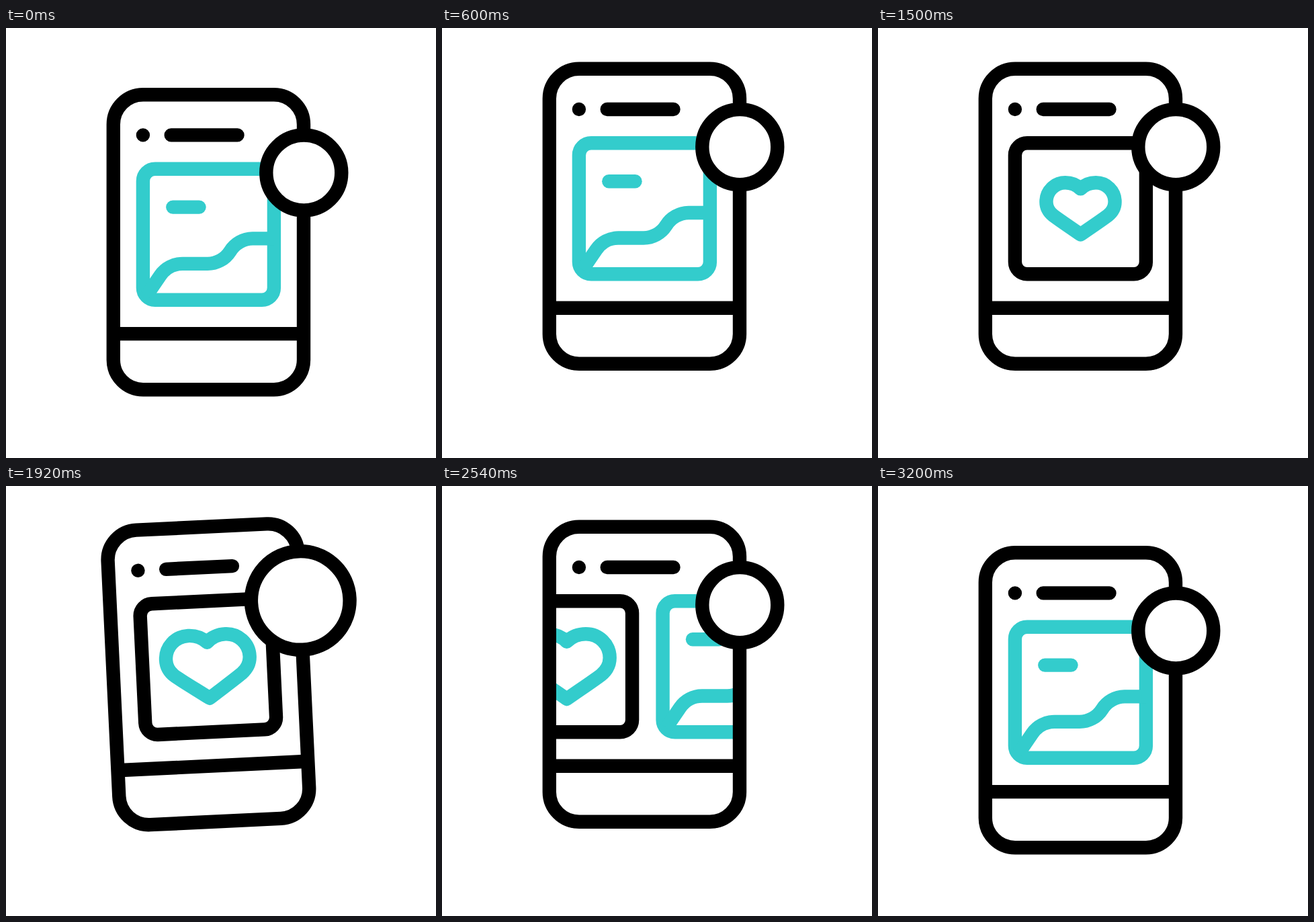
An HTML page for the animation above (3420 ms loop, 640 px wide and 640 px high).

```html
<!DOCTYPE html>
<html lang="en">
<head>
<meta charset="utf-8">
<title>Phone swipe</title>
<style>
html, body { margin: 0; width: 100%; height: 100%; overflow: hidden; background: #fff; }
svg { display: block; width: 100%; height: 100%; }
</style>
</head>
<body>
<svg viewBox="0 0 640 640" fill="none" stroke="#000" stroke-width="20.4">
  <clipPath id="screen"><path d="M160 140H443V400H160Z"/></clipPath>
  <g id="phone">
    <g clip-path="url(#screen)">
      <g id="chart" stroke="#33cccc">
        <rect x="203.9" y="171.3" width="195" height="195" rx="18"/>
        <path d="M248.3 228.2H287.5" stroke-linecap="round"/>
        <path d="M209 360L229.5 330A40 40 0 0 1 263 312.5H300A40 40 0 0 0 333.5 294A40 40 0 0 1 367 275H399"/>
      </g>
      <g id="like">
        <rect x="203.9" y="171.3" width="195" height="195" rx="18"/>
        <path id="heart" stroke="#33cccc" stroke-linejoin="round"
          d="M0-38.1C-8-46-18-49.5-28.5-49.5C-48-49.5-64-34-64-14C-64-4-59 5-51 11.5C-37 22-18 34.5 0 47.2C18 34.5 37 22 51 11.5C59 5 64-4 64-14C64-34 48-49.5 28.5-49.5C18-49.5 8-46 0-38.1Z"/>
      </g>
    </g>
    <rect x="159.8" y="60.8" width="283.2" height="439" rx="44.3"/>
    <path d="M160 416.7H443"/>
    <path d="M203.9 121h.01M245.7 121H344.5" stroke-linecap="round"/>
    <circle id="badge" cx="443.3" cy="177.1" r="56" fill="#fff"/>
  </g>
</svg>
<script>
const LOOP = 3420, STEP = 240.5, DROP = 38.4;
const el = id => document.getElementById(id);
const [phone, chart, like, heart, badge] = ['phone', 'chart', 'like', 'heart', 'badge'].map(el);

// Eased progress from 0 to 1 between two times
function ease(t, from, to) {
  const u = Math.min(1, Math.max(0, (t - from) / (to - from)));
  return u * u * (3 - 2 * u);
}

const move = (node, x) => node.setAttribute('transform', `translate(${x} 0)`);

function draw(now) {
  const t = now % LOOP;
  const w = t < 1500 ? t : t - 1500; // both shakes share one timeline
  const angle = 6 * ease(w, 200, 333) - 12 * ease(w, 333, 467) + 6 * ease(w, 467, 600);
  const y = DROP * (1 - ease(t, 0, 200) + ease(t, 3000, 3200));
  phone.setAttribute('transform', `translate(0 ${y}) rotate(${angle} 301.4 280.3)`);
  badge.setAttribute('r', 56 + 17.4 * (ease(w, 200, 415) - ease(w, 415, 600)));

  const first = ease(t, 604, 1500), second = ease(t, 2104, 3000);
  move(chart, STEP * (t < 1800 ? -first : 1 - second));
  move(like, STEP * (1 - first - second));

  const size = 0.798 + 0.202 * ease(t, 1520, 2036);
  heart.setAttribute('transform', `translate(301.5 269.8) scale(${size})`);
  heart.setAttribute('stroke-width', 20.4 / size);
}

const start = performance.now();
function tick() {
  draw(performance.now() - start);
  requestAnimationFrame(tick);
}
tick();
</script>
</body>
</html>
```
